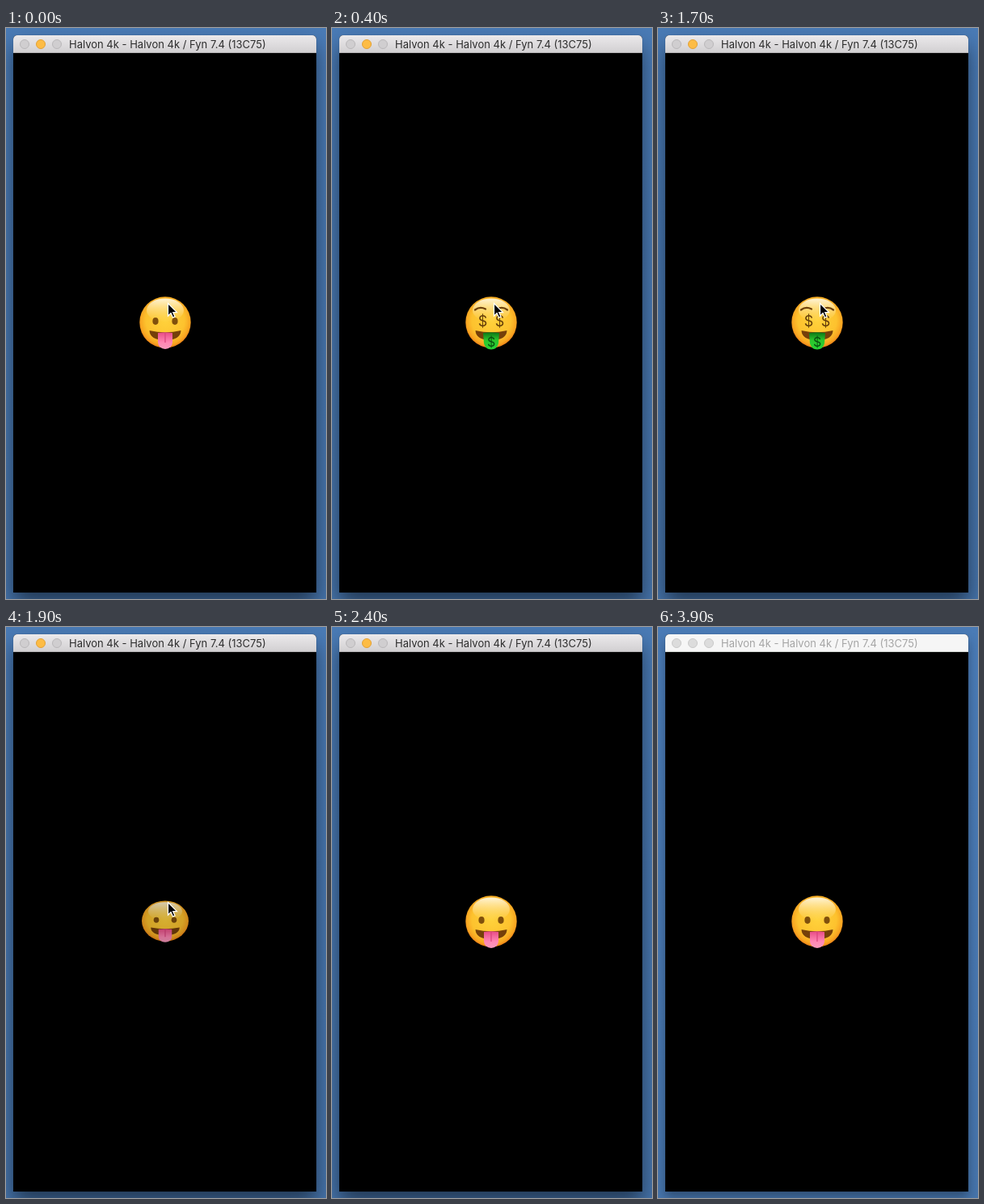
An HTML page for the animation above (6.7 s loop, 396 px wide and 706 px high).

```html
<!DOCTYPE html>
<html lang="en">
<head>
<meta charset="utf-8">
<style>
  html, body { margin: 0; height: 100%; overflow: hidden; }
  body { position: relative; background: linear-gradient(#4a7bb6, #4674ab); }
  .window {
    position: absolute; left: 9px; top: 9px; width: 375px; height: 689px;
    border-radius: 5px 5px 0 0; background: #000;
    box-shadow: 0 0 1px rgba(0,0,0,.4), 0 14px 26px rgba(0,0,0,.5);
  }
  .bar {
    position: relative; height: 22px; box-sizing: border-box; padding-left: 69px;
    border-radius: 5px 5px 0 0; border-bottom: 1px solid #b3b1b3;
    background: linear-gradient(#ebe9eb, #d2d0d2); color: #2d2d2d;
    font: 13px/23px Inter, Roboto, sans-serif; white-space: pre;
  }
  .bar i {
    position: absolute; top: 5px; width: 12px; height: 12px; box-sizing: border-box;
    border: 1px solid #bab8ba; border-radius: 50%; background: #d0ced0;
  }
  .bar i:nth-of-type(1) { left: 8px; }
  .bar i:nth-of-type(2) { left: 28px; background: #fdbc45; border-color: #e2a136; }
  .bar i:nth-of-type(3) { left: 48px; }
  .inactive .window { box-shadow: 0 0 1px rgba(0,0,0,.4), 0 7px 13px rgba(0,0,0,.32); }
  .inactive .bar { background: #f6f6f6; color: #a5a5a5; border-color: #d2d6d2; }
  .inactive .bar i { background: #dcdcdc; border-color: #c9c9c9; }
  svg { position: absolute; left: 0; top: 0; }
</style>
</head>
<body>
<div class="window">
  <div class="bar"><i></i><i></i><i></i>Halvon 4k - Halvon 4k / Fyn 7.4 (13C75)</div>
</div>
<svg width="396" height="706" viewBox="0 0 396 706">
  <defs>
    <radialGradient id="skin" cy=".46" r=".54">
      <stop offset="0" stop-color="#ffd23c"/>
      <stop offset=".7" stop-color="#fdc22e"/>
      <stop offset=".9" stop-color="#f8a521"/>
      <stop offset="1" stop-color="#ea7d16"/>
    </radialGradient>
    <linearGradient id="shine" x2="0" y2="1">
      <stop offset="0" stop-color="#fffbea" stop-opacity=".9"/>
      <stop offset="1" stop-color="#ffe28a" stop-opacity="0"/>
    </linearGradient>
    <linearGradient id="pink" x2="0" y2="1">
      <stop offset="0" stop-color="#e84c86"/>
      <stop offset=".6" stop-color="#ff86b4"/>
      <stop offset="1" stop-color="#f79abd"/>
    </linearGradient>
    <linearGradient id="green" x2="0" y2="1">
      <stop offset="0" stop-color="#0b7417"/>
      <stop offset=".45" stop-color="#2bc52c"/>
      <stop offset="1" stop-color="#27d336"/>
    </linearGradient>
    <g id="head">
      <circle r="31.7" fill="url(#skin)"/>
      <ellipse cy="-15" rx="23" ry="14.5" fill="url(#shine)"/>
      <path d="M-19.5 10Q0 14.5 19.5 10Q19 22 0 22T-19.5 10Z" fill="#75400a"/>
    </g>
  </defs>
  <g id="face">
    <g id="tongue">
      <use href="#head"/>
      <g fill="#80500c">
        <ellipse cx="-12" cy="-1.5" rx="3.6" ry="4.4"/>
        <ellipse cx="12" cy="-1.5" rx="3.6" ry="4.4"/>
      </g>
      <path d="M-9 13Q0 11.500 9 13V24.500A9 8.500 0 0 1-9 24.500Z" fill="url(#pink)"/>
      <path d="M0 13V25" stroke="#d8437c" stroke-width="1.2"/>
    </g>
    <g id="money" fill="#66400a" font-family="Inter, Roboto, sans-serif" text-anchor="middle">
      <use href="#head"/>
      <path d="M-20-15.500Q-14-20-7-16.500M20-15.500Q14-20 7-16.500" fill="none" stroke="#70430d" stroke-width="2.200" stroke-linecap="round"/>
      <g font-size="18"><text x="-10.500" y="5">$</text><text x="10.500" y="5">$</text></g>
      <path d="M-10 13Q0 11.500 10 13L9 26Q7 33.500 0 33.500T-9 26Z" fill="url(#green)"/>
      <text y="30" font-size="16" fill="#074d0f">$</text>
    </g>
  </g>
  <path id="cursor" d="M0 0V15.500L3.600 12.100 6 17.500 8.600 16.400 6.200 11.100H11Z" stroke="#fff" stroke-width="1.200"/>
</svg>
<script>
  const LOOP = 6700, STEP = 100, FLIP = 270;
  const [face, tongue, money, cursor] =
    ["face", "tongue", "money", "cursor"].map(id => document.getElementById(id));

  const clamp = v => Math.max(0, Math.min(1, v));
  const flip = (t, start) => {
    const u = clamp((t - start) / FLIP);
    return u * u * (3 - 2 * u);
  };
  const show = (el, on) => el.setAttribute("visibility", on ? "visible" : "hidden");

  function draw(now) {
    const t = Math.floor(now % LOOP / STEP) * STEP;

    // Two half turns about the horizontal axis, receding and darkening midway.
    const turn = flip(t, 0) + flip(t, 1700);
    const depth = Math.abs(Math.sin(turn * Math.PI));
    const scale = 1 - .17 * depth;
    const squash = Math.abs(Math.cos(turn * Math.PI));
    face.setAttribute("transform", `translate(197 ${364 - depth}) scale(${scale} ${scale * squash})`);
    face.setAttribute("opacity", 1 - .33 * depth);
    const rich = turn >= .5 && turn < 1.5;
    show(money, rich);
    show(tongue, !rich);

    // The pointer speeds off toward the lower right.
    const leave = clamp((t - 2100) / 200) ** 2;
    cursor.setAttribute("transform", `translate(${200.5 + 180 * leave} ${340.5 + 138 * leave})`);
    show(cursor, t < 2400);

    document.body.classList.toggle("inactive", t >= 3900);
    requestAnimationFrame(draw);
  }
  draw(performance.now());
</script>
</body>
</html>
```
